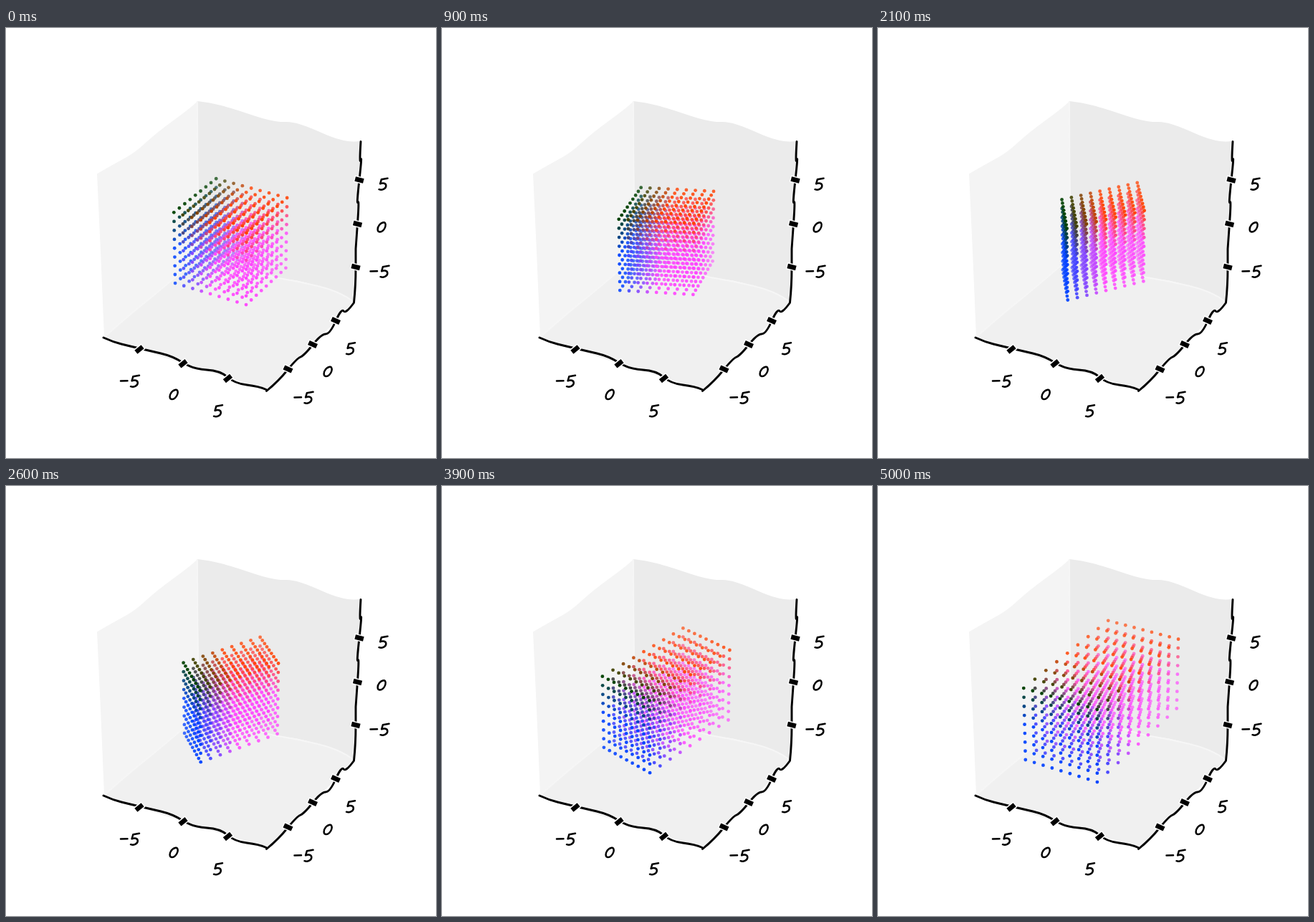
An HTML page with a canvas that plays this animation: 600 px wide and 600 px high, repeating every 5100 ms.

```html
<!DOCTYPE html>
<html lang="en">
<head>
<meta charset="utf-8">
<title>Linear transformation of a point lattice</title>
<style>
  html, body { margin: 0; width: 100%; height: 100%; overflow: hidden; background: #fff; }
  svg, canvas { position: absolute; left: 0; top: 0; width: 600px; height: 600px; }
  .axis { fill: none; stroke: #000; stroke-width: 2.9; stroke-linecap: round; stroke-linejoin: round; }
  .ridge { fill: none; stroke: #f6f6f6; stroke-width: 1.8; }
  .halo { stroke: #fff; stroke-width: 9.5; }
  .tick { stroke: #000; stroke-width: 6.6; }
  .ink { fill: none; stroke: #000; stroke-width: 2.5; stroke-linecap: round; stroke-linejoin: round; }
</style>
</head>
<body>
<svg viewBox="0 0 600 600">
  <defs>
    <path id="five" d="M6-8.2L-2.6-6.8L-4.4-.6C-.5-2.6 4-1.4 3.8 2.4C3.6 6.6-2 8.8-6 7.2"/>
    <path id="zero" d="M2.5-6.6C-1.5-6.4-5.6-1-5.4 3.2C-5.2 7.4-1 7.4 2 4.6C5.2 1.6 6.6-3.2 5-5.8C4.2-7 2-7 .8-5.8"/>
    <g id="minusFive"><path d="M-20-.6L-10.5-.8"/><use href="#five"/></g>
  </defs>

  <path fill="#f4f4f4" d="M127 203.500Q150 190 165 182T195 160T235 128T267 102L267.500 210L269.500 319Q235 350 200 378T137 431.500Q133 330 127 203.500Z"/>
  <path fill="#ebebeb" d="M267 102Q285 104 300 108T345 122T390 131T440 146T495 157.500Q492 270 485.500 382Q465 369 435 360T375 348L269.500 319Z"/>
  <path fill="#f0f0f0" d="M137 431.500Q170 402 200 378T269.500 319L375 348Q405 353 435 360T485.500 382Q460 409 428 442T363 505Q310 488 247 468T137 431.500Z"/>
  <path class="ridge" d="M267 102L267.500 210L269.500 319M137 431.500Q170 402 200 378T269.500 319L375 348Q405 353 435 360T485.500 382"/>

  <path class="axis" d="M136 432Q149 438 161 441T186 447T216 454T247 467T280 477T309 487T336 498T363 504.500"/>
  <path class="axis" d="M363.500 506.500Q380 493 393 477T411 459T428 442T446 427T460 409T471 395T485 384"/>
  <path class="axis" d="M485.500 383Q488 360 488 334T488 308T490.500 273T491 243T493 212T495 184T495 158.500"/>
  <g id="ticks"></g>
  <g class="ink" id="labels" role="img"></g>
</svg>
<canvas id="stage" width="600" height="600"></canvas>

<script>
const $ = id => document.getElementById(id);

// Tick centres per axis with the tick's half-length vector.
const axes = [
  { half: [4.6, -3.7], at: [[186, 448.5], [247, 468.3], [309.5, 489]] },
  { half: [5.6, 2.6], at: [[393.5, 476], [428, 441.5], [460, 408.5]] },
  { half: [5.8, 1.5], at: [[488, 333.5], [490.500, 273.5], [493, 212]] }
];
$('ticks').innerHTML = axes.map(({ half: [dx, dy], at }) => at.map(([x, y]) => {
  const line = (name, k) =>
    `<path class="${name}" d="M${x - dx * k} ${y - dy * k}L${x + dx * k} ${y + dy * k}"/>`;
  return line('halo', 1.22) + line('tick', 1);
}).join('')).join('');

const labels = [
  ['minusFive', 180, 493], ['zero', 234, 511.5], ['five', 296, 534.5],
  ['minusFive', 422.5, 516], ['zero', 449, 479.5], ['five', 481, 447.5],
  ['minusFive', 528.5, 340], ['zero', 524, 278], ['five', 526.5, 218]
];
const spoken = { minusFive: '-5', zero: '0', five: '5' };
$('labels').innerHTML = labels.map(([id, x, y]) =>
  `<use href="#${id}" x="${x}" y="${y}"/>`).join('');
$('labels').setAttribute('aria-label', labels.map(([id]) => spoken[id]).join(' '));

const STEP = 100, STEPS = 51, N = 4, SPAN = 17.6, DIST = 10, RADIUS = 2.4;
const ctx = $('stage').getContext('2d');
const clamp = v => Math.max(0, Math.min(1, v));

const lattice = [];
for (let x = -N; x <= N; x++)
  for (let y = -N; y <= N; y++)
    for (let z = -N; z <= N; z++) {
      const red = Math.round(255 * clamp(1 + x / 4));
      const blue = Math.round(255 * clamp(1 - z / 4));
      lattice.push({ x, y, z, rgb: `rgb(${red},64,${blue})` });
    }

// Perspective camera at elevation 30 degrees, azimuth -60 degrees.
const el = Math.PI / 6, az = -Math.PI / 3;
const ce = Math.cos(el), se = Math.sin(el), ca = Math.cos(az), sa = Math.sin(az);

function project(x, y, z) {
  const right = (-sa * x + ca * y) / SPAN;
  const up = (-ca * se * x - sa * se * y + ce * z) / SPAN;
  const w = DIST - (ca * ce * x + sa * ce * y + se * z) / SPAN;
  return { sx: 313.8 + 2513.5 * right / w, sy: 296.8 - 2497 * up / w, w };
}

// Blend from the identity to (x, y) -> (-y, 2x).
function draw(t) {
  const dots = lattice.map(({ x, y, z, rgb }) => ({
    rgb, ...project((1 - t) * x - t * y, 2 * t * x + (1 - t) * y, z)
  })).sort((a, b) => b.w - a.w);
  const far = 1 / dots[0].w, near = 1 / dots[dots.length - 1].w;

  ctx.clearRect(0, 0, 600, 600);
  for (const { sx, sy, w, rgb } of dots) {
    const alpha = 0.3 + 0.7 * (1 / w - far) / (near - far);
    ctx.globalAlpha = 1 - (1 - alpha) ** 1.8;
    ctx.fillStyle = rgb;
    ctx.beginPath();
    ctx.arc(sx, sy, RADIUS, 0, 2 * Math.PI);
    ctx.fill();
  }
}

const start = performance.now();
let shown = -1;
function tick() {
  const step = Math.floor((performance.now() - start) / STEP) % STEPS;
  if (step !== shown) draw((shown = step) / (STEPS - 1));
  requestAnimationFrame(tick);
}
tick();
</script>
</body>
</html>
```
